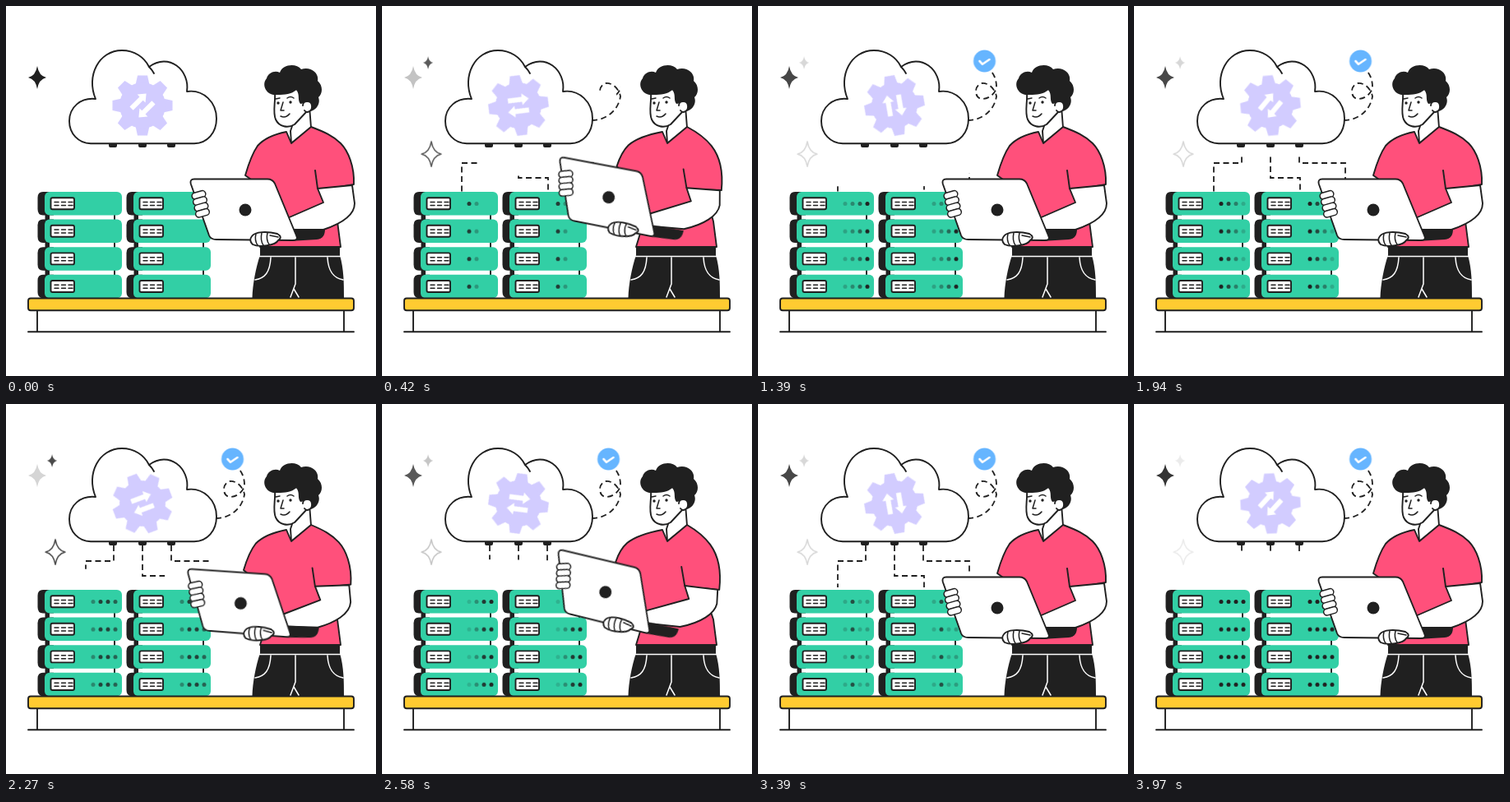
Animation, 450 px wide and 450 px high, one loop 4000 ms. Source, as an HTML page:

```html
<!DOCTYPE html>
<html lang="en">
<head>
<meta charset="utf-8">
<title>Cloud servers</title>
<style>
  html, body { margin: 0; width: 100%; height: 100%; overflow: hidden; background: #fff; }
  svg { display: block; width: 100vw; height: 100vh; fill: #202020; }

  .line { fill: none; stroke: #202020; stroke-width: 1.9; stroke-linecap: round; stroke-linejoin: round; }
  .skin { fill: #fff; }
  .pink { fill: #ff507b; }
  .thin { stroke-width: 1.5; }
  .white { stroke: #fff; }
  .dash { fill: none; stroke: #202020; stroke-width: 1.8; stroke-dasharray: 7 4.5; }

  /* gear */
  .gear { animation: spin 4s linear infinite; }
  @keyframes spin { to { transform: rotate(360deg); } }

  /* links between servers and cloud */
  .reveal { fill: none; stroke: #fff; stroke-width: 8; stroke-dasharray: 1 2; }
  .flow { animation: flow 1333.333ms linear infinite; }
  @keyframes flow {
    0% { stroke-dashoffset: -1; }
    50% { stroke-dashoffset: 0; animation-timing-function: cubic-bezier(.35, .15, .9, .8); }
    100% { stroke-dashoffset: 1; }
  }
  .trail { animation: trail 4s linear infinite; }
  @keyframes trail { 0% { stroke-dashoffset: 1; } 18%, 100% { stroke-dashoffset: 0; } }

  .check { animation: pop 4s ease-in-out infinite; }
  @keyframes pop {
    0%, 16.5% { transform: scale(0); }
    26.5% { transform: scale(1.3); }
    34%, 100% { transform: scale(1); }
  }

  /* stars */
  .fade { animation: fade 666.667ms linear infinite; }
  .glow { animation: glow 666.667ms linear infinite; }
  @keyframes fade { 50% { opacity: 0; } }
  @keyframes glow { 0%, 100% { opacity: 0; } 50% { opacity: 1; } }

  /* server lights */
  .d0 { animation: d0 4s linear infinite; }
  .d1 { animation: d1 4s linear infinite; }
  .d2 { animation: d2 4s linear infinite; }
  .d3 { animation: d3 4s linear infinite; }
  @keyframes d0 { 0%, 30%, 62.5%, 87.5% { opacity: 0; } 12.5%, 48.5%, 75%, 99%, 100% { opacity: 1; } }
  @keyframes d1 {
    0%, 6%, 71%, 91% { opacity: 0; } 37.5% { opacity: .3; }
    20%, 53.5%, 82.5%, 99%, 100% { opacity: 1; }
  }
  @keyframes d2 {
    0%, 12.5% { opacity: 0; } 42.5% { opacity: .2; } 82.5% { opacity: .1; }
    27%, 61%, 99%, 100% { opacity: 1; }
  }
  @keyframes d3 {
    0%, 21.5% { opacity: 0; } 48.5% { opacity: .2; } 81% { opacity: .1; }
    35%, 64%, 99%, 100% { opacity: 1; }
  }

  /* lifting the laptop */
  .laptop, .shirt, .arm, .fold { animation: 2s cubic-bezier(.6, 0, .4, 1) infinite; }
  .laptop { animation-name: lift; transform-origin: 291px 248px; }
  .shirt { animation-name: shirt; }
  .arm { animation-name: arm; }
  .fold { animation-name: fold; }
  @keyframes lift {
    0%, 66.667%, 100% { transform: translate(0, 0) rotate(0deg); }
    33.333% { transform: translate(-19.6px, -19.6px) rotate(13.6deg); }
  }
  @keyframes shirt {
    0%, 66.667%, 100% { d: path("M341 153C326 156 314 161 306 170C299 180 295 192 291 206L318 225L316 270L309 293L407 293L403 262L400 221L423 217C424 195 416 176 407 167C398 158 387 153 371 147L347 167Z"); }
    33.333% { d: path("M341 153C325 156 308 161 298 169C291 175 287 183 284 192L306 220L316 270L309 293L407 293L403 262L390 224L410 226C413 200 407 182 399 171C391 160 383 154 371 147L347 167Z"); }
  }
  @keyframes arm {
    0%, 66.667%, 100% { d: path("M421 218L424 240C424 256 404 266 386 272L330 272L340 259L386 239L379 222Z"); }
    33.333% { d: path("M408 226L407 243C404 255 388 266 362 271L308 265L318 252L373 237L368 221Z"); }
  }
  @keyframes fold {
    0%, 66.667%, 100% { d: path("M376 200L379 222"); }
    33.333% { d: path("M364 198L368 221"); }
  }
</style>
</head>
<body>
<svg viewBox="0 0 450 450">
  <defs>
    <path id="star" d="M0-14Q2-2 11 0Q2 2 0 14Q-2 2-11 0Q-2-2 0-14Z"/>
    <path id="linkA" pathLength="1" d="M131 172V191H97V227"/>
    <path id="linkB" pathLength="1" d="M166 172V209H202V227"/>
    <path id="linkC" pathLength="1" d="M201 172V191H257V212"/>
    <path id="curl" pathLength="1" d="M255 139C272 139 287 128 290 110C289 103 282 93 272 94C262 97 263 113 273 113C281 113 289 106 290 99C290 90 288 84 281 76"/>
    <mask id="flowMask" maskUnits="userSpaceOnUse" x="0" y="0" width="450" height="450">
      <use href="#linkA" class="reveal flow"/>
      <use href="#linkB" class="reveal flow"/>
      <use href="#linkC" class="reveal flow"/>
    </mask>
    <mask id="curlMask" maskUnits="userSpaceOnUse" x="0" y="0" width="450" height="450">
      <use href="#curl" class="reveal trail"/>
    </mask>
    <path id="arrow" d="M-10 12V-5H-14L-7-13.500L0-5H-4V12Z" fill="#fff"/>
  </defs>

  <g transform="translate(38 87)"><use href="#star" class="fade"/></g>
  <g transform="translate(56 69) scale(.55)"><use href="#star" class="glow"/></g>
  <g transform="translate(60 180) scale(1.08)"><use href="#star" class="line thin glow"/></g>

  <g mask="url(#flowMask)">
    <path class="dash" d="M131 172V191H97V227M166 172V209H202V227M201 172V191H257V212"/>
  </g>
  <g mask="url(#curlMask)">
    <path class="dash" d="M255 139C272 139 287 128 290 110C289 103 282 93 272 94C262 97 263 113 273 113C281 113 289 106 290 99C290 90 288 84 281 76"/>
  </g>

  <!-- cloud -->
  <path d="M125 167h10v3q0 2-2 2h-6q-2 0-2-2zM161 167h10v3q0 2-2 2h-6q-2 0-2-2zM196 167h10v3q0 2-2 2h-6q-2 0-2-2z"/>
  <path class="line skin" d="M103 167.300C88 167 77 155 77 140C77 123 91 111 109 113C97 85 113 54 141 54C156 54 168 62 174 74C198 56 224 78 220 104C240 101 256 117 256 137C256 154 245 167 229 167.300Z"/>
  <path class="line" d="M174 74Q178 78 180 82"/>
  <g transform="translate(166 121)">
    <g class="gear">
      <g id="teeth" fill="#d2ccff"></g>
      <circle r="28" fill="#d2ccff"/>
      <g transform="rotate(45)">
        <use href="#arrow"/>
        <use href="#arrow" transform="rotate(180)"/>
      </g>
    </g>
  </g>

  <g transform="translate(275.500 67)">
    <g class="check">
      <circle r="13.500" fill="#66b5ff"/>
      <path class="line white" style="stroke-width:2.600" d="M-6 0L-2.500 3.800L6-2"/>
    </g>
  </g>

  <g id="racks"></g>

  <!-- table -->
  <rect class="line" style="fill:#ffcb31" x="27" y="355.500" width="396" height="14.800" rx="3"/>
  <path class="line" d="M38 371V396M411 371V396M27 396.300H423"/>

  <!-- man -->
  <path d="M309 292H406V303C411 320 411 338 411 355H299.500C300 338 304 318 309 303Z"/>
  <path class="line white thin" d="M308 304.500H407M322 306C321 324 315 331 303 333M391 306C392 324 399 331 410 333M352 306V338L346 354M350 344L356 354"/>
  <path class="line skin" d="M349 143L346 152L347 167L371 148L369 122Z"/>
  <path class="line shirt pink" d="M341 153C326 156 314 161 306 170C299 180 295 192 291 206L318 225L316 270L309 293L407 293L403 262L400 221L423 217C424 195 416 176 407 167C398 158 387 153 371 147L347 167Z"/>
  <path class="line fold" d="M376 200L379 222"/>
  <path class="line skin" d="M327 104C328 118 324 129 328 138C332 147 343 149 351 144L366 128V100Z"/>
  <path d="M325 108C315 106 311 95 317 88C319 81 327 78 333 81C336 71 353 69 359 77C370 73 381 81 379 91C386 97 385 107 380 111C383 119 377 127 370 128L364 118L358 119C354 114 358 108 353 102C346 109 333 108 325 108Z"/>
  <path class="line skin" d="M361 121C361 115 371 114 372 121C373 128 366 131 363 127"/>
  <path class="line thin" d="M328 113L333 112M342 112Q346 109 350 112M337 117L334 127H338M334 134Q340 137 345 131"/>
  <circle cx="331" cy="118" r="1.700"/>
  <circle cx="346" cy="117" r="1.700"/>
  <path class="line arm skin" d="M421 218L424 240C424 256 404 266 386 272L330 272L340 259L386 239L379 222Z"/>

  <g class="laptop">
    <path d="M325 272L388 271C388 278 386 283 378 284L345 286Z"/>
    <path class="line skin" d="M229 210.500H318Q324 210.500 327 216L353 279Q356 285 349 285L256 284Q249 284 247 279L225 217Q223 210.500 229 210.500Z"/>
    <circle cx="291" cy="248" r="7.500"/>
    <g id="fingers" class="line skin thin"></g>
    <path class="line skin" d="M299 280C303 274 318 274 330 277Q337 281 331 285C328 291 308 294 300 290Q295 285 299 280Z"/>
    <path class="line thin" d="M304 277Q302 285 306 291M311 276Q309 285 313 291M318 276Q316 284 320 290M321 279L331 281"/>
  </g>
</svg>
<script>
  const fill = (id, html) => { document.getElementById(id).innerHTML = html; };
  const repeat = (n, fn) => Array.from({ length: n }, (_, i) => fn(i)).join("");

  const tooth = i => `<path d="M-8.500-25L-6-36.500H6L8.500-25Z" transform="rotate(${i * 45})"/>`;

  const finger = i =>
    `<rect x="-8" y="-4" width="17" height="8" rx="4"
      transform="translate(${234 + i * 1.5} ${230 + i * 7.3}) rotate(-16)"/>`;

  const light = i => `<circle class="d${i}" cx="${106 + i * 9}" cy="14.500" r="2.500"/>`;

  const server = row => `<g transform="translate(0 ${226 + row * 33.6})">
    <path d="M58 0H45Q38.500 0 38.500 7V21Q38.500 28.500 45 28.500H58Z"/>
    <rect x="47" width="94" height="28.500" rx="6" fill="#32cfa5"/>
    <rect class="line skin" x="54.500" y="7.200" width="28.500" height="14" rx="2"/>
    <path class="line thin" stroke-linecap="butt" stroke-dasharray="5 3.500" d="M59 12.500H82M59 16.500H82"/>
    ${repeat(4, light)}</g>`;

  const rack = col => `<g transform="translate(${col * 108} 0)">
    <rect class="line skin" x="51" y="240" width="81" height="110"/>
    <rect x="47.500" y="240" width="5.500" height="110"/>
    ${repeat(4, server)}</g>`;

  fill("teeth", repeat(8, tooth));
  fill("fingers", repeat(4, finger));
  fill("racks", repeat(2, rack));
</script>
</body>
</html>
```
